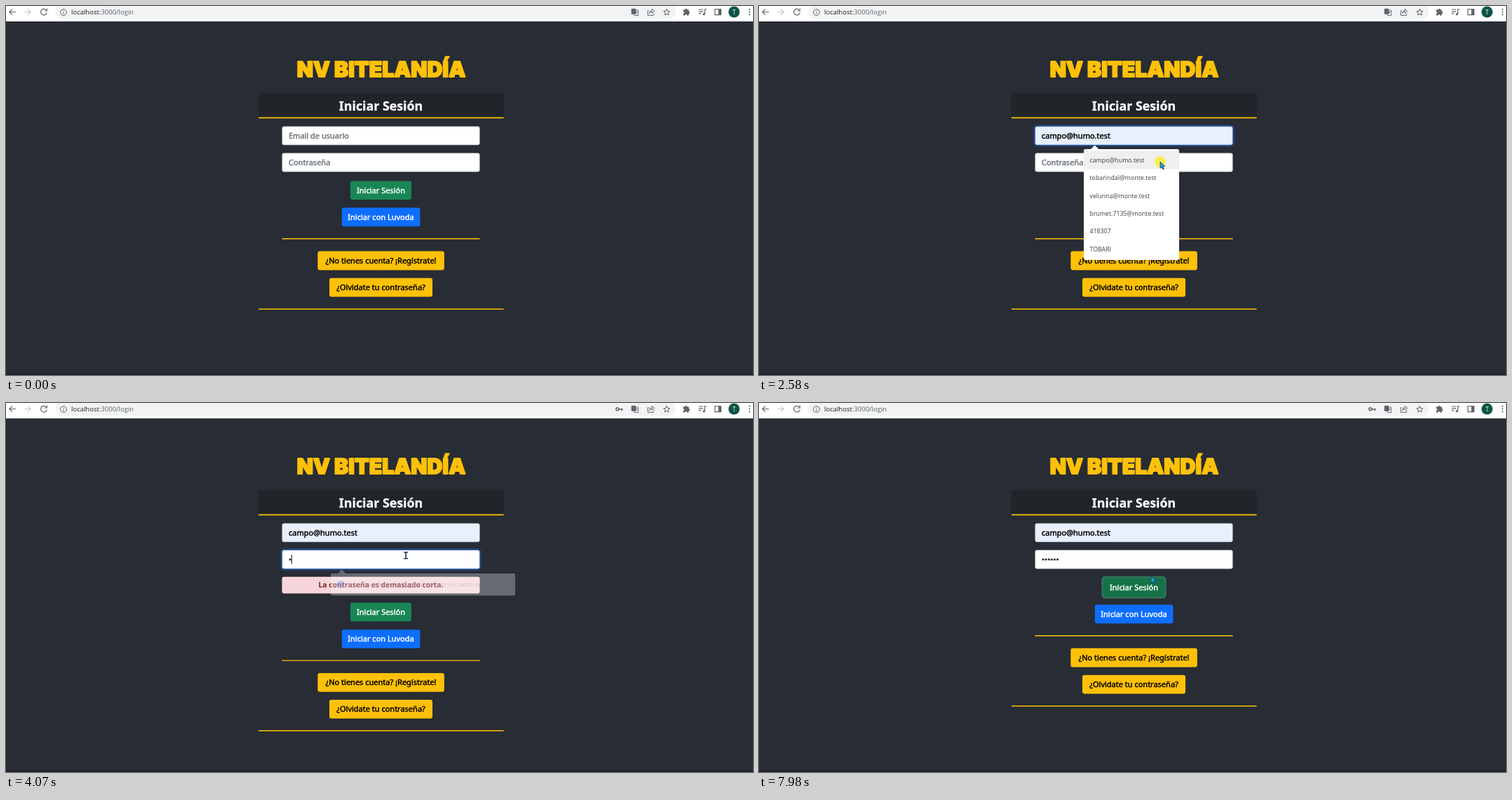
Write an HTML page with a canvas that moves like this. It is 1065 px wide and 526 px high and loops after 8 s.

```html
<!DOCTYPE html>
<html lang="es">
<head>
<meta charset="utf-8">
<title>Iniciar Sesión</title>
<style>
html, body { margin: 0; width: 100%; height: 100%; overflow: hidden; background: #282c34; }
canvas { display: block; width: 1065px; height: 526px; }
</style>
</head>
<body>
<canvas id="stage" width="1065" height="526"></canvas>
<script>
const ctx = document.getElementById('stage').getContext('2d');
const LOOP = 8000, MID = 534.5;
const UI = '"Noto Sans", "Open Sans", sans-serif';
const SMALL = '"Open Sans", "Noto Sans", sans-serif';
const YELLOW = '#ffc107', DARK = '#212529', ICON = '#5f6368';
const EMAIL = 'campo@humo.test';
const SAVED = [EMAIL, 'tobarindal@monte.test', 'velurina@monte.test',
  'brumet.7135@monte.test', '418307', 'TOBARI'];

// pointer path: time, x, y
const PATH = [
  [660, 1042, 516], [1430, 594, 185], [1850, 594, 185], [2250, 572, 222],
  [3860, 572, 222], [4100, 570, 217], [5790, 570, 217], [6060, 606, 236],
  [6340, 586, 257], [6550, 581, 256], [6750, 566, 254], [7640, 566, 254],
  [7980, 559, 247]
];
const CLICKS = [[1500, 1850], [2580, 2720], [3120, 3300], [6830, 7040]];
const KEYS = [3930, 4270, 4600, 4930, 5260, 5590];

const clamp = v => Math.max(0, Math.min(1, v));
const ramp = (t, a, b) => clamp((t - a) / (b - a));
const within = (t, a, b) => t >= a && t < b;

function pointerAt(t) {
  for (let i = 1; i < PATH.length; i++) {
    const [t0, x0, y0] = PATH[i - 1], [t1, x1, y1] = PATH[i];
    if (t <= t1) {
      const p = ramp(t, t0, t1), e = p * p * (3 - 2 * p);
      return { x: x0 + (x1 - x0) * e, y: y0 + (y1 - y0) * e };
    }
  }
  const [, x, y] = PATH[PATH.length - 1];
  return { x, y };
}

function rect(x, y, w, h, fill, r = 0) {
  ctx.fillStyle = fill;
  ctx.beginPath();
  ctx.roundRect(x, y, w, h, r);
  ctx.fill();
}

function disc(x, y, r, fill) {
  ctx.fillStyle = fill;
  ctx.beginPath();
  ctx.arc(x, y, r, 0, Math.PI * 2);
  ctx.fill();
}

// weight: extra outline that thickens the glyphs
function text(str, x, y, font, fill, align = 'left', weight = 0) {
  ctx.font = font;
  ctx.fillStyle = fill;
  ctx.textAlign = align;
  ctx.fillText(str, x, y);
  if (!weight) return;
  ctx.lineJoin = 'round';
  ctx.lineWidth = weight;
  ctx.strokeStyle = fill;
  ctx.strokeText(str, x, y);
}

const label = (str, x, y, fill, align) => text(str, x, y, '500 11px ' + UI, fill, align, .45);

function line(d, color = ICON, width = 1.2) {
  ctx.strokeStyle = color;
  ctx.lineWidth = width;
  ctx.stroke(new Path2D(d));
}

function shape(d, fill) {
  ctx.fillStyle = fill;
  ctx.fill(new Path2D(d));
}

function toolbar(t) {
  rect(0, 0, 1065, 22, '#fff');
  rect(70, -2, 885, 20.5, '#f1f3f4', 10);
  line('M14 8.5H5M9 4.3L4.8 8.5L9 12.7');
  line('M26 8.5H35M31 4.3L35.2 8.5L31 12.7', '#c4c7ca');
  line('M57.3 5.6A4.4 4.4 0 1 0 58.3 9.4M58.3 3.6V7H54.8');
  line('M77.5 9a4.4 4.4 0 1 0 8.8 0a4.4 4.4 0 1 0 -8.8 0M81.9 8.5V11.5M81.9 6.4V7.5', ICON, 1);

  const font = '9.5px ' + SMALL;
  text('localhost', 93, 12.3, font, '#202124');
  text(':3000/login', 93 + ctx.measureText('localhost').width, 12.3, font, ICON);

  if (t >= KEYS[0]) {
    line('M869.6 8.7a2 2 0 1 0 4 0a2 2 0 1 0 -4 0M873.6 8.7H879.5M878 8.7V11', ICON, 1.5);
  }
  rect(891.5, 3.8, 6.5, 8, ICON, 1);
  line('M898 6H901.3V13.5H896L895.3 11.8M897.5 8.3H900.5M899.8 8.5L897.6 11.5', ICON, .9);
  line('M916.5 6.5H915V13.3H923V10.5M917.3 10.5Q917.8 6.5 921 6.3V4.2L924.3 7.3L921 10V8Q918.7 8 917.3 10.5Z', ICON, 1);
  line('M942 4.3L943.3 7.3L946.5 7.6L944 9.7L944.8 12.9L942 11.2L939.2 12.9L940 9.7L937.5 7.6L940.7 7.3Z', ICON, 1);
  shape('M965.5 5.3H968.2A1.5 1.5 0 0 1 971.2 5.3H973.5V8A1.5 1.5 0 0 1 973.5 11V13.5H970.8A1.4 1.4 0 0 0 968 13.5H965.5V10.8A1.4 1.4 0 0 0 965.5 8Z', ICON);
  line('M987.5 5H994M987.5 7.8H994M987.5 10.6H991M996.3 11.5V4.7H998.5', ICON, 1.2);
  disc(995, 11.7, 1.6, ICON);
  line('M1010.7 4.5H1019.3V12.7H1010.7Z', ICON, 1.2);
  rect(1015.5, 4.5, 4, 8.2, ICON);
  disc(1038, 8.5, 8, '#0b5546');
  text('T', 1038, 11.7, '8.5px ' + SMALL, '#fff', 'center');
  for (const y of [4.7, 8.5, 12.3]) disc(1060, y, 1.1, ICON);
}

function header() {
  const font = '900 30.2px Inter, "Noto Sans", sans-serif';
  text('NV BITELANDÍA', MID + .5, 100.6, font, YELLOW, 'center', 1.8);
  rect(360, 124, 349.5, 35, DARK);
  rect(360, 158.6, 349.5, 1.6, YELLOW);
  text('Iniciar Sesión', MID, 148.8, 'bold 17.8px ' + UI, '#fff', 'center', .3);
}

function input(y, h, fill, focus) {
  rect(393.5, y, 282, h, '#ced4da', 3);
  if (focus > 0) {
    const s = 2.8 * focus;
    rect(393.5 - s, y - s, 282 + 2 * s, h + 2 * s, '#213d66', 3 + s);
    ctx.save();
    ctx.globalAlpha = focus;
    rect(393.5, y, 282, h, '#86b7fe', 3);
    ctx.restore();
  }
  rect(394.2, y + .7, 280.6, h - 1.4, fill, 2.4);
}

function caret(x, y) {
  rect(x, y - 6.5, 1.1, 13, '#111');
}

function emailField(t) {
  const focus = t < 3190 ? ramp(t, 1720, 1870) : 0;
  const filled = t >= 2100;
  input(171.5, 26.7, filled ? '#e8f0fe' : '#fff', focus);
  label(filled ? EMAIL : 'Email de usuario', 403, 188.6, filled ? '#000' : '#6c757d');
  const w = ctx.measureText(EMAIL).width;
  if (within(t, 1600, 2100)) caret(402.5, 185);
  if (within(t, 2650, 3190)) {
    caret(403 + w, 185);
    ctx.setLineDash([1.5, .8]);
    line(`M403 190.6H${403 + w}`, '#e5483f', .9);
    ctx.setLineDash([]);
  }
}

function passwordField(t) {
  const focus = t < 6900 ? ramp(t, 3170, 3270) : 0;
  input(209.5, 27, '#fff', focus);
  const count = KEYS.filter(k => t >= k).length;
  if (!count) label('Contraseña', 403, 226.8, '#6c757d');
  for (let i = 0; i < count; i++) disc(405 + i * 4.1, 223, 1.55, DARK);
  if (within(t, 3190, 3660) || within(t, 3860, 6090)) caret(402.6 + count * 4.1, 222.8);
}

function button(str, x, y, w, h, fill, color) {
  rect(x, y, w, h, fill, 3);
  label(str, MID, y + h / 2 + 3.9, color, 'center');
}

function form(t, p) {
  emailField(t);
  passwordField(t);
  const alert = within(t, 2650, KEYS[5]);
  const dy = alert ? 35.3 : 0;
  if (alert) {
    rect(393.5, 247.8, 282, 23.8, '#f6d6da', 3);
    const msg = t < KEYS[0] ? 'La contraseña es obligatoria.' : 'La contraseña es demasiado corta.';
    text(msg, MID, 263.3, 'bold 10.3px ' + UI, '#842029', 'center');
  }
  const hover = t > 6340 && p.x < 578;
  if (t >= 6900) rect(488.2, 246.7, 92.6, 32.1, '#30705a', 5.5);
  button('Iniciar Sesión', 491, 249.4 + dy, 87, 26.6, hover ? '#157347' : '#198754', '#fff');
  button('Iniciar con Luvoda', 478.8, 287.6 + dy, 111.6, 26.6, '#0d6efd', '#fff');
  rect(393.5, 331.1 + dy, 282, 1.4, YELLOW);
  button('¿No tienes cuenta? ¡Regístrate!', 444.4, 349.6 + dy, 180.4, 26.8, YELLOW, '#000');
  button('¿Olvidate tu contraseña?', 461, 387.7 + dy, 147, 26.7, YELLOW, '#000');
  rect(360, 431.3 + dy, 349.5, 1.4, YELLOW);
}

function bubble(x, y, w, h) {
  rect(x, y, w, h, '#fff', 2.5);
  shape(`M${x + 10} ${y}L${x + 15.7} ${y - 5.5}L${x + 21.4} ${y}Z`, '#fff');
}

function savedList(t) {
  const out = ramp(t, 2700, 2900);
  const alpha = ramp(t, 1600, 1740) * (1 - out);
  if (!alpha) return;
  ctx.save();
  ctx.globalAlpha = alpha;
  const s = 1 - .036 * out;
  ctx.translate(531, 283);
  ctx.scale(s, s);
  ctx.translate(-531, -283);
  bubble(463, 204, 136, 158);
  if (within(t, 2100, 2700)) rect(463, 207, 136, 25.4, '#efefef');
  SAVED.forEach((name, i) =>
    text(name, 471.5, 222.8 + i * 25.4, '8.8px ' + SMALL, '#3c4043'));
  ctx.restore();
}

function accountHint(t) {
  const alpha = ramp(t, 3200, 3300) * (1 - ramp(t, 3930, 4130));
  if (!alpha) return;
  ctx.save();
  ctx.globalAlpha = alpha;
  bubble(463, 243, 263, 31.5);
  disc(477, 258.5, 5.5, '#4285f4');
  text('Usar las contraseñas guardadas en tu cuenta de Luvoda', 491, 262, '8.4px ' + SMALL, '#6f7378');
  ctx.restore();
}

function pointer(t, p) {
  if (t < 660) return;
  if (CLICKS.some(([a, b]) => within(t, a, b))) disc(p.x, p.y, 8, 'rgba(250,240,60,.85)');
  const overList = within(t, 1600, 2920) && p.y > 204;
  const inRow = within(p.y, 171.5, 198.2) || within(p.y, 209.5, 236.5);
  ctx.save();
  ctx.translate(p.x, p.y);
  if (inRow && within(p.x, 393.5, 675.5) && !overList) {
    line('M-3 -4.5H3M0 -4.5V4.5M-3 4.5H3', '#1b3a55', 1.6);
  } else {
    const arrow = 'M0 0V9.2L2.1 7.4L3.8 10.8L5.4 10L3.8 6.8L6.6 6.4Z';
    shape(arrow, '#22a7e8');
    line(arrow, '#10304d', .8);
  }
  ctx.restore();
}

function draw(t) {
  const p = pointerAt(t);
  rect(0, 0, 1065, 526, '#282c34');
  rect(0, 524, 1065, 2, '#1e2126');
  toolbar(t);
  header();
  form(t, p);
  savedList(t);
  accountHint(t);
  pointer(t, p);
}

const start = performance.now();
function tick(now) {
  draw(Math.max(0, now - start) % LOOP);
  requestAnimationFrame(tick);
}
draw(0);
requestAnimationFrame(tick);
</script>
</body>
</html>
```
